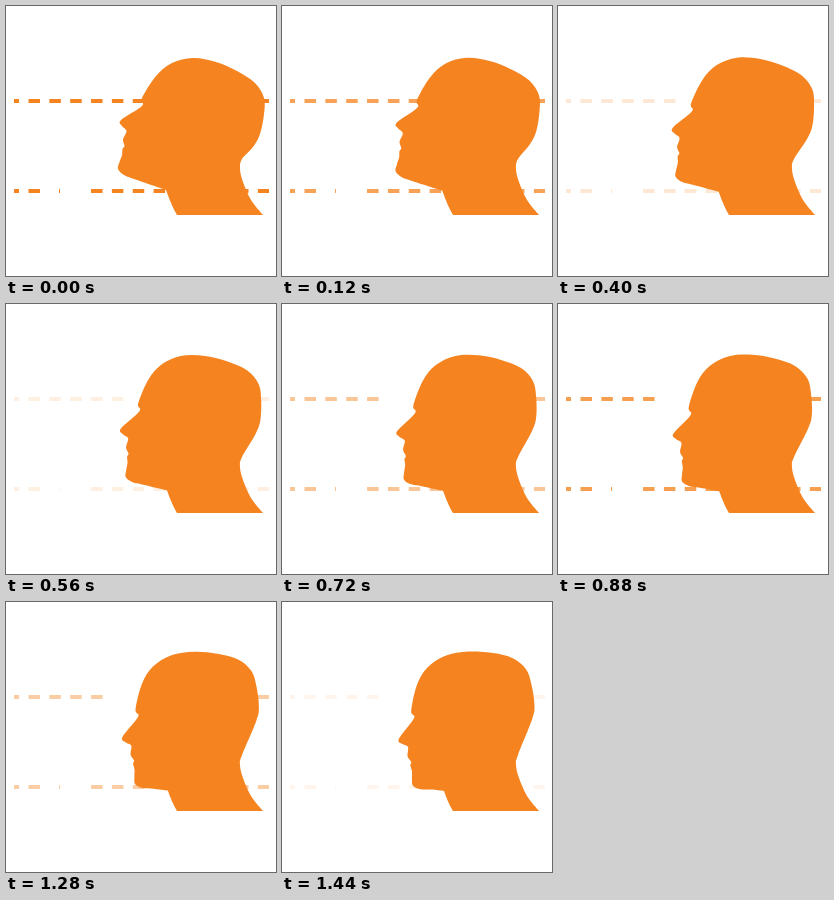
An HTML page that plays this animation: 270x270 px, repeating every 1.48 s.

```html
<!DOCTYPE html>
<html lang="en">
<head>
<meta charset="utf-8">
<title>Head tilt</title>
<style>
  html, body { margin: 0; width: 100%; height: 100%; overflow: hidden; background: #fff; }
  svg { display: block; width: 100%; height: 100%; }
  path { fill: #f58420; }
</style>
</head>
<body>
<svg viewBox="0 0 270 270">
  <g id="guides">
    <path id="upper"/>
    <path id="lower"/>
  </g>
  <path id="head"/>
</svg>
<script>
const LOOP = 1480, STEP = 40, LAST = LOOP - STEP, FADE = LOOP / 3;
const PITCH = 20.85, FIRST = 22.5, DASH = 11.5, RIGHT = 263, COUNT = 12;
const TILT = 20 * Math.PI / 180, PIVOT = [180, 119.6];

// Jaw, mouth, nose, brow and skull turn as one piece; the nape stays put.
const face = [
  [128, 173], [118, 169], [112, 163], [113.5, 156], [116, 149], [116.5, 143],
  [118.5, 140], [117, 133.5], [120.5, 125], [116, 120], [115, 114],
  [136, 100], [136, 92], [150, 70], [166, 57], [187, 52]
];
const skull = [[210, 56], [231, 65], [249, 77], [258, 92], [258, 108], [254, 128], [247, 141]];
const nape = [[236, 153], [234, 163], [237, 176], [245, 194], [257, 209]];

const byId = id => document.getElementById(id);
const head = byId('head'), guides = byId('guides');
const upper = byId('upper'), lower = byId('lower');

function turn([x, y], angle) {
  const dx = x - PIVOT[0], dy = y - PIVOT[1];
  const c = Math.cos(angle), s = Math.sin(angle);
  return [PIVOT[0] + dx * c + dy * s, PIVOT[1] - dx * s + dy * c];
}

function spline(points) {
  const at = i => points[Math.max(0, Math.min(points.length - 1, i))];
  return points.slice(1).map((end, i) => {
    const from = at(i), before = at(i - 1), after = at(i + 2);
    const c1 = from.map((v, k) => v + (end[k] - before[k]) / 6);
    const c2 = end.map((v, k) => v - (after[k] - from[k]) / 6);
    return `C${c1} ${c2} ${end}`;
  }).join('');
}

function outline(p) {
  const throat = [160 + 2 * p, 184 + 5 * p];
  const turned = face.concat(skull).map(pt => turn(pt, TILT * p));
  return `M171 209Q166 201 ${throat}` + spline([throat, ...turned, ...nape]) + 'Z';
}

const bar = (x, w) => `M${x} 0h${w}v4h${-w}z`;

function dashes(shown) {
  let d = bar(8, 5);
  for (let i = 0; i < COUNT; i++) {
    const x = FIRST + i * PITCH;
    if (shown(i)) d += bar(x, Math.min(DASH, RIGHT - x));
  }
  return d;
}

upper.setAttribute('transform', 'translate(0 93)');
lower.setAttribute('transform', 'translate(0 183)');
lower.setAttribute('d', dashes(i => i < 1 || i > 2) + bar(53, 1));

function draw(t) {
  const u = t / LAST;
  head.setAttribute('d', outline(u * (1.3 - 0.3 * u)));
  guides.setAttribute('opacity', Math.abs(1 - (t / FADE) % 2));
  // The upper line draws back from the brow as the head comes down.
  const reach = Math.max(3.5, 6 - t / 360);
  upper.setAttribute('d', dashes(i => i < reach || i === COUNT - 1));
}

const start = performance.now();
function tick() {
  const t = (performance.now() - start) % LOOP;
  draw(Math.floor(t / STEP) * STEP);
  requestAnimationFrame(tick);
}
tick();
</script>
</body>
</html>
```
